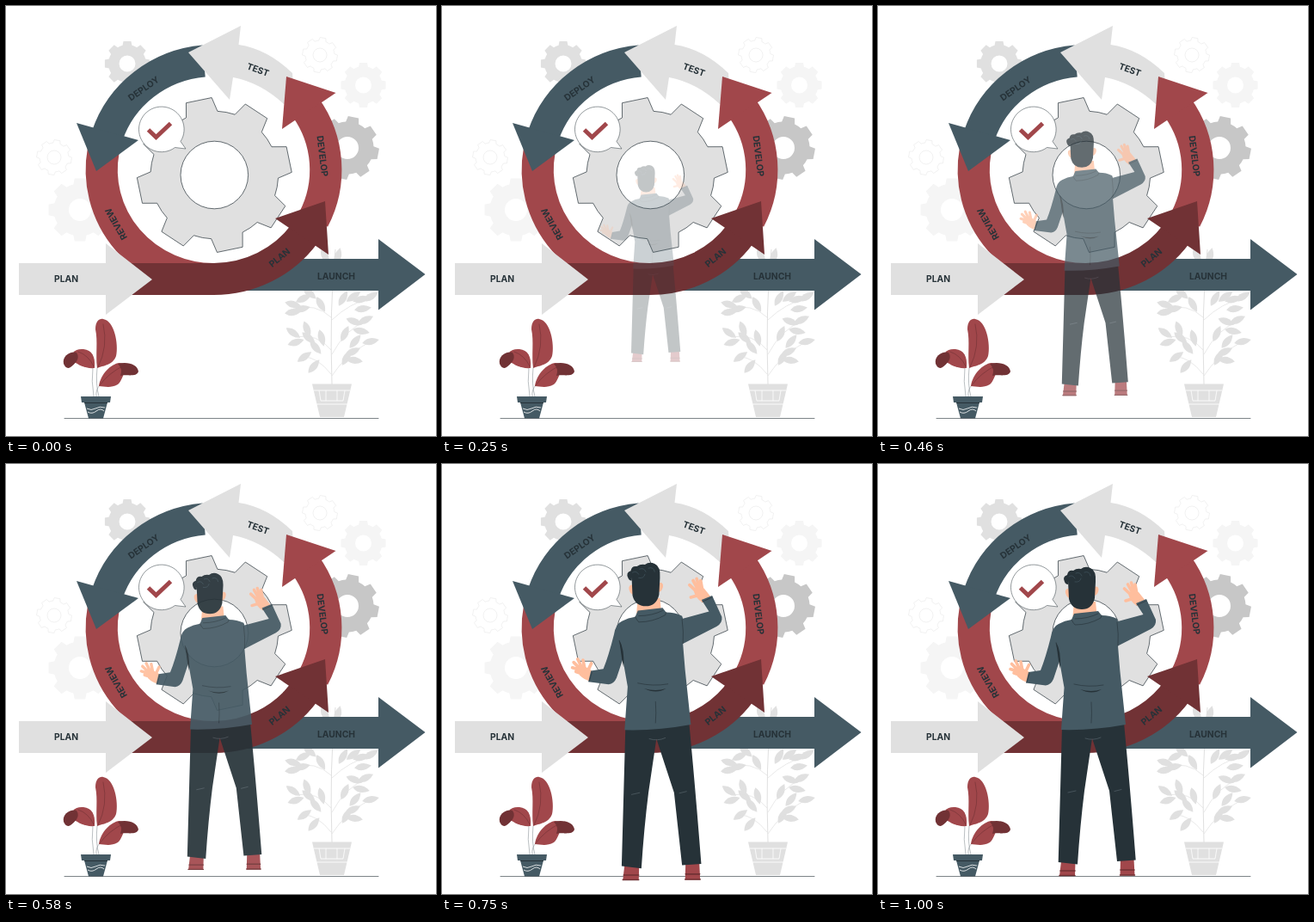
Recreate the animation shown at these times as an HTML page. Size 500 px wide and 500 px high, loop 1.04 s.

```html
<!DOCTYPE html>
<html lang="en">
<head>
<meta charset="utf-8">
<style>
html, body { margin: 0; width: 100%; height: 100%; overflow: hidden; background: #fff; }
svg { display: block; width: 100%; height: 100%; }
text { font: 700 10.3px Inter, "Open Sans", sans-serif; fill: #263238; text-anchor: middle; }
.red { fill: #a1474b; }
.deep { fill: #713235; }
.slate { fill: #455a64; }
.pale { fill: #e0e0e0; }
.ink { fill: #263238; }
.skin { fill: #ffbe9d; }
.line { fill: none; stroke: #263238; stroke-width: .6; stroke-linecap: round; }
.finger { fill: none; stroke: #ffbe9d; stroke-width: 3.6; stroke-linecap: round; }
.white { fill: none; stroke: #fff; stroke-width: .8; }
</style>
</head>
<body>
<svg viewBox="0 0 500 500">
  <g id="gears"></g>

  <!-- tall plant -->
  <g id="leaves" class="pale"></g>
  <path d="M379 440Q376 350 383 283" fill="none" stroke="#e0e0e0"/>
  <path class="pale" d="M356 439.500H402L393 478H365Z"/>
  <path class="white" d="M358 447H400M364 447L366 459H392L394 447M372 447V459M385 447V459M361 463H397"/>

  <path class="slate" d="M280 294H433V271L487.500 312L433 353.500V331H280Z"/>

  <g id="main"></g>
  <g id="ring"></g>
  <path class="pale" d="M15 299H116V276L170 318L116 359V336H15Z"/>
  <g id="labels"></g>

  <!-- speech bubble -->
  <path d="M203 157.500L209 166L196.500 164.500A26.300 26.300 0 1 1 203 157.500Z" fill="#fff" stroke="#263238" stroke-width=".5"/>
  <path d="M165.500 144L174.500 152.500L191.500 136.500" fill="none" stroke="#a1474b" stroke-width="5"/>

  <!-- small plant -->
  <path class="line" d="M106 421Q104 440 108 454M101 420Q99 436 102 454M109 441Q104 446 105 454" style="stroke:#8b9499"/>
  <path class="red" d="M106 421C104 405 107 390 104 376C104 366 109 363 113 364C126 366 131 393 128 407C124 418 113 418 106 421Z"/>
  <path class="red" d="M103 421C92 422 84 417 78 413C74 404 80 398 90 399C100 400 104 407 103 421Z"/>
  <path class="deep" d="M67 416C65 407 75 401 82 403C87 410 80 416 75 420Q70 423 67 416Z"/>
  <path class="red" d="M108 442C110 428 122 416 132 415L141 417C136 430 134 437 130 440C121 445 114 442 108 442Z"/>
  <path class="deep" d="M130 416C142 413 153 417 154 425C152 432 141 428 133 430Q136 422 130 416Z"/>
  <path class="line" d="M107 420Q119 396 113 370M102 419Q96 406 84 402M109 441Q119 427 137 418" style="stroke:#713235"/>
  <path class="slate" d="M87 454H122L121 461H118L113 479.500H96L91 461H88Z"/>
  <path class="ink" d="M91 461H118L117.700 462H91.300Z"/>
  <path class="white" d="M94 468Q99 471 104 468T115 467M95 472Q100 475 105 471T114 471"/>

  <path class="line" d="M68 479.500H433"/>

  <g id="man">
    <path class="red" d="M213 462H229.500L229 479H211ZM282 459H297.500L298.500 478.500H281.500Z"/>
    <path class="line" d="M211 478.500H229M281.500 478H298.500M212 473H229M282 472H298" style="stroke:#713235;stroke-width:1.5"/>
    <path class="ink" d="M214 306L209.700 463L232 465.500Q235 420 240 380L249 319L269 380L278 462L299.700 460.500Q295 400 290.500 350L286 301Z"/>
    <path class="line" d="M221 382L230 380M275 380.500L283 378.500M241 319Q250 322 259 318" style="stroke:#5d6b72"/>

    <path class="skin" d="M228 160H253L254.500 175Q241 184 226.500 177Z"/>
    <path class="skin" d="M161 239Q166 235 171 239L178 243L175 254Q168 253 162 247Z"/>
    <path class="finger" d="M162 241L154 238.500M163 240L155.500 232.500M165 239L160 229M168 240L166 230M171 243L175.500 233.500M164 245L158 243"/>
    <path class="skin" d="M291 151Q296 145 303 149L311 159L301 165Q293 160 291 151Z"/>
    <path class="finger" d="M294 152L286.500 145M296 150L290.500 140M298 149L294.500 138M301 151L299 140M295 157L288 159"/>

    <path class="slate" d="M228 174L256 171L260 176Q270 176 278 180L279 183L308.500 175L300 162L312 157L323 181Q324 188 317 192L279 211.500Q281 240 284.500 270L288 303Q250 310 213 309L216.500 260L211 229L204 250Q201 257 195 257.500L172 254.500L175 242L189 240Q195 225 201 201Q203 189 210 186Q217 182 225 181Z"/>
    <path class="line" d="M225 181Q227 185 229 187Q245 187 259 179L260 176M229 180Q244 180 256 174M207 208Q210 217 211 229M278 184Q280 198 279 211M228 256Q245 260 262 257M248 277Q249 290 248 301M176 244L173 254M301 164L312 159"/>
    <path class="ink" d="M235 262Q248 266 260 262Q249 269 235 262ZM207 207Q213 217 212 238L210 229Z"/>

    <path class="skin" d="M224 145Q217 144 218 150Q220 157 225 156ZM251 143Q257 141 256.500 147Q255 153 251 153Z"/>
    <path class="ink" d="M221 136L222 157Q225 169 237 169Q249 169 252 156L253 137Q254 124 247 121Q241 118 236 122Q231 121 227 124Q221 123 220 129Q214 131 217 137Q218 140 221 140Z"/>
    <path class="line" d="M222 131Q226 128 229 133M230 127Q235 125 237 130M229 137Q235 138 236 133M240 126Q246 124 247 130" style="stroke:#455a64"/>
  </g>
</svg>
<script>
const $ = id => document.getElementById(id);
const rad = d => d * Math.PI / 180;
const at = (cx, cy, rx, ry, deg) =>
  `${(cx + rx * Math.cos(rad(deg))).toFixed(2)} ${(cy + ry * Math.sin(rad(deg))).toFixed(2)}`;

// Eight-toothed gear with a round hole
function gear(cx, cy, r, hole, phase, style) {
  const root = r * .825;
  let d = '';
  for (let k = 0; k < 8; k++) {
    const a = phase + 45 * k, p = (q, off) => at(cx, cy, q, q, a + off);
    d += `${k ? `A${root} ${root} 0 0 1 ` : 'M'}${p(root, -14.5)}L${p(r, -9.7)}L${p(r, 9.7)}L${p(root, 14.5)}`;
  }
  d += `A${root} ${root} 0 0 1 ${at(cx, cy, root, root, phase - 14.5)}Z`;
  d += `M${cx - hole} ${cy}a${hole} ${hole} 0 1 0 ${2 * hole} 0a${hole} ${hole} 0 1 0 ${-2 * hole} 0Z`;
  return `<path d="${d}" fill-rule="evenodd" ${style}/>`;
}

const outline = 'fill="#fff" stroke="#ebebeb" stroke-width=".7"';
$('gears').innerHTML =
  gear(141, 67, 26.5, 9.5, -90, 'fill="#e0e0e0"') +
  gear(365, 57, 20.5, 8, -80, outline) +
  gear(415.5, 92, 26.5, 9.5, -90, 'fill="#f5f5f5"') +
  gear(397, 165, 37, 13, -79, 'fill="#c7c7c7"') +
  gear(56, 176, 20.5, 8, -80, outline) +
  gear(86, 237, 37, 13, -90, 'fill="#f5f5f5"');
$('main').innerHTML = gear(242.3, 196.5, 90, 39.3, -101.7, 'fill="#e0e0e0" stroke="#263238" stroke-width=".7"');

// Leaves: centre and angle
const leaves = [
  [334, 356, -8], [334, 347, 15], [346, 340, -25], [344, 352, -12], [353, 334, 40], [366, 347, 60],
  [334, 380, 35], [337, 391, -18], [350, 376, 70], [352, 386, 40], [367, 386, 75], [347, 408, -35],
  [358, 419, -50], [360, 397, 50], [371, 291, 65], [386, 291, -75], [392, 340, -60], [404, 338, -35],
  [413, 341, -15], [415, 352, -8], [424, 338, -30], [394, 381, -65], [405, 367, 20], [413, 378, 12],
  [424, 390, -12], [406, 390, -50], [403, 402, -25], [405, 412, 8], [396, 409, -60], [418, 365, -25]
];
$('leaves').innerHTML = leaves.map(([x, y, a]) =>
  `<path d="M-10 0Q-1 -8 10 0Q-1 8 -10 0Z" transform="translate(${x} ${y}) rotate(${a})"/>`).join('') +
  ['M378 362Q360 345 334 352', 'M378 400Q362 380 336 385', 'M378 428Q362 408 346 408',
   'M379 365Q400 345 424 340', 'M379 405Q395 375 420 366', 'M379 430Q395 405 424 390']
    .map(d => `<path d="${d}" fill="none" stroke="#e0e0e0" stroke-width=".7"/>`).join('');

// Ring of arrows
const band = (a, b, color) =>
  `<path d="M${at(241.5, 190.5, 130.3, 127, a)}A130.300 127 0 0 ${b > a ? 1 : 0} ${at(241.5, 190.5, 130.3, 127, b)}"
    fill="none" stroke="${color}" stroke-width="37.2"/>`;
const shape = (cls, d) => `<path class="${cls}" d="${d}"/>`;
$('ring').innerHTML =
  band(190, 90, '#a1474b') +
  band(265, 198, '#455a64') + shape('slate', 'M82 136L154 156L105 192Z') +
  shape('pale', 'M212 54L273 23L270.500 45Q304 50 333 78L335 110L323 114Q296 89 264 83L260 109Z') +
  band(27, -35, '#a1474b') + shape('red', 'M326 82L383.500 101L321 143Z') +
  band(90, 36, '#713235') + shape('deep', 'M140 299H242V336H140ZM313 247L371 227L375 289Z');

$('labels').innerHTML = [
  ['PLAN', 70, 317.5, 0], ['LAUNCH', 384, 314, 0], ['TEST', 293, 74, 20], ['DEPLOY', 160, 96, -35],
  ['DEVELOP', 368, 174.5, 83], ['REVIEW', 128, 253.5, -120], ['PLAN', 318, 292.5, -39]
].map(([s, x, y, a]) => `<text transform="translate(${x} ${y}) rotate(${a})" y="3.7">${s}</text>`).join('');

// cubic-bezier(.36, -.01, .5, 1.38)
function ease(x) {
  const curve = (s, p, q) => 3 * (1 - s) ** 2 * s * p + 3 * (1 - s) * s * s * q + s ** 3;
  let lo = 0, hi = 1;
  for (let i = 0; i < 24; i++) {
    const mid = (lo + hi) / 2;
    if (curve(mid, .36, .5) < x) lo = mid; else hi = mid;
  }
  return curve(lo, -.01, 1.38);
}

// The man zooms and fades in, at 24 steps a second
const man = $('man'), LOOP = 1040, start = performance.now();
function draw(now) {
  const t = Math.max(0, now - start) % LOOP;
  const step = Math.floor((t + 5) * 24 / 1000);
  const p = ease(Math.min(1, step / 24 + .025));
  man.setAttribute('transform', `translate(238 299.5) scale(${.5 + p / 2}) translate(-238 -299.5)`);
  man.setAttribute('opacity', Math.min(1, Math.max(0, p)));
  requestAnimationFrame(draw);
}
draw(start);
</script>
</body>
</html>
```
